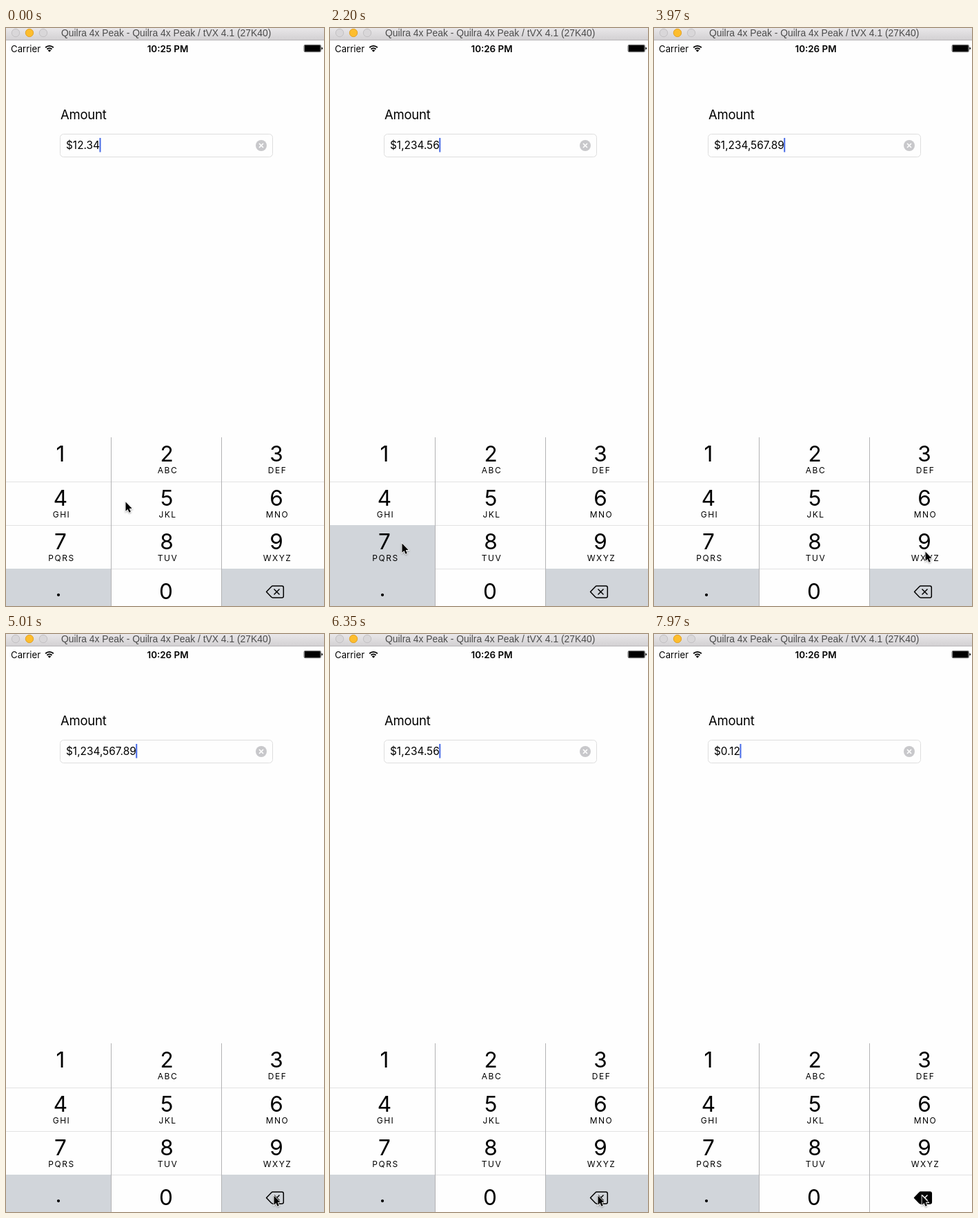
These frames come from a looping animation (461x836 px, 8000 ms). An HTML page:

```html
<!DOCTYPE html>
<html lang="en">
<head>
<meta charset="utf-8">
<title>Amount field</title>
<style>
  html, body { margin: 0; width: 100%; height: 100%; overflow: hidden; background: #fefefe; }
  svg { display: block; font-family: Inter, Roboto, sans-serif; }
  .title { font: 13.87px "Liberation Sans", Arial, sans-serif; fill: #4c4c4c; }
  .digit { font-size: 31.5px; text-anchor: middle; }
  .letters { font-size: 12px; letter-spacing: 1.5px; text-anchor: middle; }
</style>
</head>
<body>
<svg width="461" height="836" viewBox="0 0 461 836">
  <defs>
    <linearGradient id="bar" x2="0" y2="1">
      <stop stop-color="#e9e7e9"/><stop offset="1" stop-color="#d3d1d3"/>
    </linearGradient>
  </defs>

  <!-- window bar -->
  <rect width="461" height="17" fill="url(#bar)"/>
  <rect y="17" width="461" height="1" fill="#b9b7b9"/>
  <g fill="#d9d7d9" stroke="#c3c1c3">
    <circle cx="14" cy="7" r="5.7"/>
    <circle cx="34" cy="7" r="5.7" fill="#fdbd2d" stroke="#e2a32a"/>
    <circle cx="54" cy="7" r="5.7"/>
  </g>
  <text class="title" x="80" y="12">Quilra 4x Peak - Quilra 4x Peak / tVX 4.1 (27K40)</text>

  <!-- status bar -->
  <text x="7" y="34.5" font-size="13.2">Carrier</text>
  <g fill="none" stroke="#000" stroke-width="1.9">
    <path d="M57.2 28.2a8.3 8.3 0 0 1 11.6 0M59.5 30.7a5 5 0 0 1 7 0"/>
    <path d="M63 34.8l-2.2-2.4a3.2 3.2 0 0 1 4.4 0z" fill="#000" stroke="none"/>
  </g>
  <text id="clock" x="234.5" y="34.5" font-size="13.4" font-weight="600" text-anchor="middle"></text>
  <rect x="432" y="24.3" width="24.5" height="10.4" rx="2" fill="none" stroke="#000" stroke-width=".6"/>
  <rect x="432.8" y="25" width="22.9" height="9" rx="1"/>
  <path d="M457.5 27.7q1.700 .3 1.700 1.800t-1.700 1.800z"/>

  <!-- form -->
  <text x="79" y="132" font-size="18.5" letter-spacing="-.25">Amount</text>
  <rect x="78.5" y="153.5" width="308" height="33" rx="5" fill="#fefefe" stroke="#dedede"/>
  <text id="amount" x="87" y="175" font-size="15.4"></text>
  <rect id="caret" y="159" width="2" height="20.5" fill="#4569e6"/>
  <circle cx="370" cy="170" r="8" fill="#c8c8cb"/>
  <path d="M367 167l6 6m0-6l-6 6" stroke="#fff" stroke-width="1.7"/>

  <!-- keypad -->
  <path d="M0 656.5H461M0 719.5H461M0 782.5H461" stroke="#e2e2e3"/>
  <g id="keys"></g>
  <path d="M152.5 592V836M312.5 592V836" stroke="#b2b2b4"/>
  <g id="labels"></g>
  <g stroke-width="1.5" stroke-linejoin="round" stroke="#000">
    <path id="erase" d="M377.5 815.5l7.2-7.6q.8-.9 2-.9H400q2.3 0 2.3 2.3v12.4q0 2.3-2.3 2.3H386.700q-1.200 0-2-.9z"/>
    <path id="cross" d="M388.500 811.500l8 8m0-8l-8 8"/>
  </g>

  <path id="pointer" d="M.5 .5V13.800L3.500 11L5.600 15.800L7.800 14.800L5.700 10.100H9.700Z"
        stroke="#fff" stroke-width="1.600" paint-order="stroke"
        style="filter:drop-shadow(0 1px 1px #0005)"/>
</svg>
<script>
const $ = id => document.getElementById(id);
const LOOP = 8000, STEP = 147.6;
const GREY = '#d1d5da';
const edgeX = [0, 153, 313, 461], edgeY = [592, 656, 719, 782, 836];
const midX = [79, 233, 392], baseY = [627, 691, 754, 825.5];
const letters = ['', 'ABC', 'DEF', 'GHI', 'JKL', 'MNO', 'PQRS', 'TUV', 'WXYZ'];
const names = [...'123456789.0<'];

function add(parent, tag, attrs, text = '') {
  const el = document.createElementNS('http://www.w3.org/2000/svg', tag);
  for (const k in attrs) el.setAttribute(k, attrs[k]);
  el.textContent = text;
  return $(parent).appendChild(el);
}

const keys = names.map((name, i) => {
  const c = i % 3, r = Math.floor(i / 3);
  const x = midX[c], y = baseY[r];
  if (name === '.') add('labels', 'text', { class: 'digit', x: 76, y: 821.5 }, name);
  else if (name !== '<') add('labels', 'text', { class: 'digit', x: x - (name === '0' ? 1 : 0), y }, name);
  if (letters[i]) add('labels', 'text', { class: 'letters', x: x + 1.5, y: y + 17 }, letters[i]);
  return add('keys', 'rect', {
    x: edgeX[c], y: edgeY[r],
    width: edgeX[c + 1] - edgeX[c], height: edgeY[r + 1] - edgeY[r]
  });
});

// Presses as [step, key]; each lasts one step.
const presses = [
  [1, '5'], [6, '6'], [15, '7'], [19, '8'], [24, '9'],
  ...[35, 38, 42, 45, 48, 51, 54].map(n => [n, '<'])
];
// Pointer path as [step, x, y].
const path = [
  [0, 173, 685], [2, 173, 685], [4, 406, 714], [7, 406, 714], [10, 170, 771],
  [12, 93, 750], [13, 104, 745], [16, 104, 745], [18, 200, 757], [20, 225, 760],
  [21, 272, 765], [22, 364, 769], [23, 384, 764], [25, 385, 763], [27, 393, 757],
  [28, 393, 757], [32, 388, 812], [55, 388, 812]
];

function pointerAt(n) {
  const i = path.findIndex(p => p[0] > n);
  const [a, x, y] = path[i - 1], [b, x2, y2] = path[i];
  const k = (n - a) / (b - a);
  return [x + (x2 - x) * k, y + (y2 - y) * k];
}

// Digits appear on release, deletions happen on touch.
function stateAt(n) {
  let cents = 1234, edited = 0, down = '';
  for (const [at, key] of presses) {
    if (at === n) down = key;
    const when = key === '<' ? at : at + 1;
    if (when > n) continue;
    cents = key === '<' ? Math.floor(cents / 10) : cents * 10 + +key;
    edited = when;
  }
  return { cents, edited, down };
}

function caretAlpha(ms) {
  const p = ms % 1000;
  if (p < 550) return 1;
  if (p < 700) return (700 - p) / 150;
  return Math.min(1, Math.max(0, (p - 800) / 100));
}

function draw(now) {
  const n = Math.floor((now % LOOP + 20) / STEP);
  const { cents, edited, down } = stateAt(n);
  const amount = $('amount');
  amount.textContent = '$' + (cents / 100).toLocaleString('en-US', { minimumFractionDigits: 2 });
  $('caret').setAttribute('x', 86.5 + amount.getComputedTextLength());
  $('caret').setAttribute('opacity', caretAlpha((n - edited) * STEP));
  $('clock').textContent = n < 9 ? '10:25 PM' : '10:26 PM';
  keys.forEach((key, i) => {
    const special = names[i] === '.' || names[i] === '<';
    key.setAttribute('fill', special !== (names[i] === down) ? GREY : 'none');
  });
  const erasing = down === '<';
  $('erase').setAttribute('fill', erasing ? '#000' : 'none');
  $('cross').setAttribute('stroke', erasing ? '#fff' : '#000');
  $('pointer').setAttribute('transform', `translate(${pointerAt(n)})`);
}

const start = performance.now();
function tick() {
  draw(performance.now() - start);
  requestAnimationFrame(tick);
}
tick();
</script>
</body>
</html>
```
